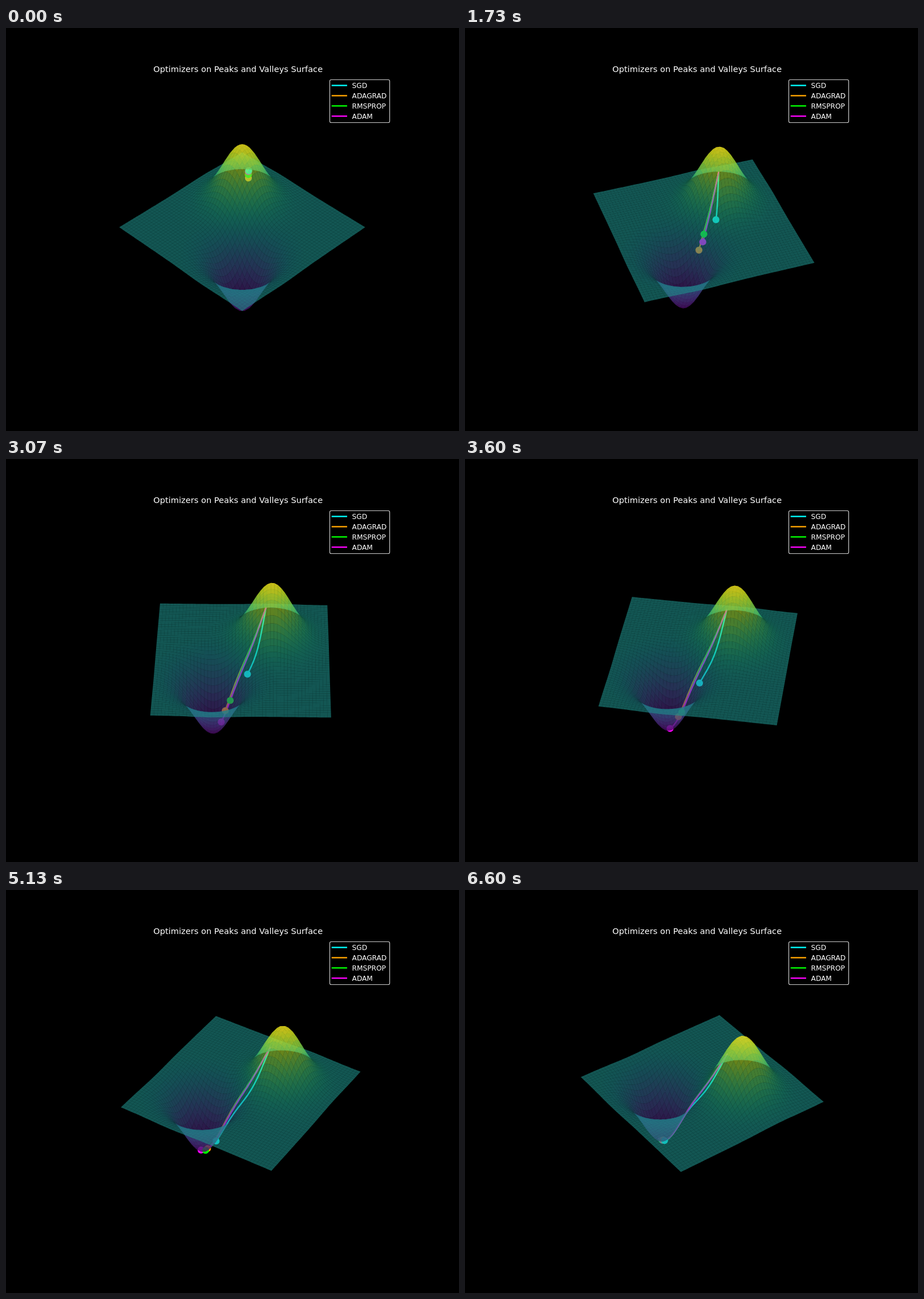
An HTML page with a canvas that plays this animation: 794 px wide and 705 px high, repeating every 6660 ms.

```html
<!DOCTYPE html>
<html lang="en">
<head>
<meta charset="utf-8">
<title>Optimizers on Peaks and Valleys Surface</title>
<style>
  html, body { margin: 0; width: 100%; height: 100%; overflow: hidden; background: #000; }
  canvas { display: block; }
</style>
</head>
<body>
<canvas id="stage" width="794" height="705"></canvas>
<script>
const ctx = document.getElementById('stage').getContext('2d');
const LOOP = 6660, FRAMES = 100;
const CX = 414, CY = 348.6;     // screen centre of the plot
const UNIT = 50.8, FOCAL = 3001; // pixels per data unit, camera distance
const HILL = 125, PIT = 129;     // heights in pixels
const ELEV = 40 * Math.PI / 180, SE = Math.sin(ELEV), CE = Math.cos(ELEV);
const CELLS = 50, HALF = 3, ALPHA = 0.6;

const bump = (x, y, c) => Math.exp(-((x - c) ** 2) - (y - c) ** 2);
const height = (x, y) => HILL * bump(x, y, 1) - PIT * bump(x, y, -1);

function gradient([x, y]) {
  const a = 2 * bump(x, y, 1), b = 2 * bump(x, y, -1);
  return [x, y].map(p => (1 - p) * a + (1 + p) * b);
}

// Each rule returns the step for one coordinate, given gradient, memory and step count.
const optimizers = [
  { name: 'SGD', color: '#00ffff', step: g => 0.0337 * g },
  { name: 'ADAGRAD', color: '#ffa500', step(g, m) {
    m.v += g * g;
    return 0.1 * g / Math.sqrt(m.v);
  } },
  { name: 'RMSPROP', color: '#00ff00', step(g, m) {
    m.v = 0.9 * m.v + 0.1 * g * g;
    return 0.02 * g / Math.sqrt(m.v);
  } },
  { name: 'ADAM', color: '#ff00ff', step(g, m, k) {
    m.m = 0.9 * m.m + 0.1 * g;
    m.v = 0.999 * m.v + 0.001 * g * g;
    return 0.03 * (m.m / (1 - 0.9 ** k)) / Math.sqrt(m.v / (1 - 0.999 ** k));
  } }
];

for (const o of optimizers) {
  const memory = [{ m: 0, v: 0 }, { m: 0, v: 0 }];
  o.path = [[0.8, 0.5]];
  for (let k = 1; k <= FRAMES; k++) {
    const p = o.path[k - 1], g = gradient(p);
    o.path.push(p.map((c, i) => c - o.step(g[i], memory[i], k)));
  }
}

// Polynomial fit of the viridis colour map, highest power first.
const VIRIDIS = [
  [-5.4355, 4.7764, 6.2283, -4.6342, -0.3309, 0.1051, 0.2777],
  [4.6459, -13.7451, 14.1799, -5.7991, 0.2148, 1.4046, 0.0054],
  [26.3124, -65.3530, 56.6906, -19.3324, 0.0951, 1.3846, 0.3341]
];
function viridis(t) {
  const rgb = VIRIDIS.map(c => Math.round(255 * Math.min(1, Math.max(0, c.reduce((s, k) => s * t + k, 0)))));
  return `rgba(${rgb},${ALPHA})`;
}

const vertices = [], faces = [];
const at = i => HALF * (2 * i / CELLS - 1);
for (let j = 0; j <= CELLS; j++) {
  for (let i = 0; i <= CELLS; i++) vertices.push([at(i), at(j), height(at(i), at(j))]);
}
for (let j = 0; j < CELLS; j++) {
  for (let i = 0; i < CELLS; i++) {
    const n = j * (CELLS + 1) + i;
    const ids = [n, n + 1, n + CELLS + 2, n + CELLS + 1];
    const level = ids.reduce((s, id) => {
      const z = vertices[id][2];
      return s + z / (z > 0 ? HILL : PIT);
    }, 0) / 4;
    faces.push({ ids, color: viridis((level + 1) / 2), depth: 0 });
  }
}

function camera(degrees) {
  const sn = Math.sin(degrees * Math.PI / 180), cs = Math.cos(degrees * Math.PI / 180);
  return ([x, y, z]) => {
    const along = (x + y) * UNIT / Math.SQRT2, across = (x - y) * UNIT / Math.SQRT2;
    const u = along * sn + across * cs, back = along * cs - across * sn;
    const depth = 1 + (back * CE - z * SE) / FOCAL;
    return [CX + u / depth, CY - (z * CE + back * SE) / depth, depth];
  };
}

function drawPaths(project, count) {
  ctx.lineWidth = 2.44;
  ctx.lineJoin = 'round';
  ctx.lineCap = 'square';
  const dots = optimizers.map(o => {
    const pts = o.path.slice(0, count + 1).map(([x, y]) => project([x, y, height(x, y)]));
    ctx.beginPath();
    pts.forEach(p => ctx.lineTo(p[0], p[1]));
    ctx.strokeStyle = o.color;
    ctx.stroke();
    return { p: pts[count], color: o.color };
  });
  dots.sort((a, b) => b.p[2] - a.p[2]);
  for (const { p, color } of dots) {
    ctx.beginPath();
    ctx.arc(p[0], p[1], 6.1, 0, 2 * Math.PI);
    ctx.fillStyle = color;
    ctx.fill();
  }
}

function drawSurface(project) {
  const pts = vertices.map(project);
  for (const f of faces) f.depth = f.ids.reduce((s, id) => s + pts[id][2], 0);
  faces.sort((a, b) => b.depth - a.depth);
  for (const f of faces) {
    ctx.beginPath();
    for (const id of f.ids) ctx.lineTo(pts[id][0], pts[id][1]);
    ctx.closePath();
    ctx.fillStyle = f.color;
    ctx.fill();
  }
}

function drawLabels() {
  ctx.fillStyle = '#fff';
  ctx.textAlign = 'center';
  ctx.font = '14.6px "DejaVu Sans", sans-serif';
  ctx.fillText('Optimizers on Peaks and Valleys Surface', 406.7, 77);

  ctx.beginPath();
  ctx.roundRect(567.5, 90.5, 105, 75, 2.5);
  ctx.fillStyle = '#000';
  ctx.fill();
  ctx.lineWidth = 1.2;
  ctx.strokeStyle = '#ccc';
  ctx.stroke();

  ctx.textAlign = 'left';
  ctx.font = '12.15px "DejaVu Sans", sans-serif';
  optimizers.forEach((o, i) => {
    const y = 100.5 + 17.9 * i;
    ctx.fillStyle = o.color;
    ctx.fillRect(570.7, y - 1.2, 27.2, 2.4);
    ctx.fillStyle = '#fff';
    ctx.fillText(o.name, 606.6, y + 4.7);
  });
}

function draw(n) {
  const project = camera(n);
  ctx.fillStyle = '#000';
  ctx.fillRect(0, 0, 794, 705);
  drawPaths(project, n + 1);
  drawSurface(project);
  drawLabels();
}

// Three frames every 200 ms, lasting 70, 60 and 70 ms.
function frameAt(ms) {
  const rest = ms % 200;
  return Math.min(FRAMES - 1, 3 * Math.floor(ms / 200) + (rest >= 70) + (rest >= 130));
}

let shown = -1;
function tick() {
  const n = frameAt(performance.now() % LOOP);
  if (n !== shown) draw(shown = n);
  requestAnimationFrame(tick);
}
tick();
</script>
</body>
</html>
```
